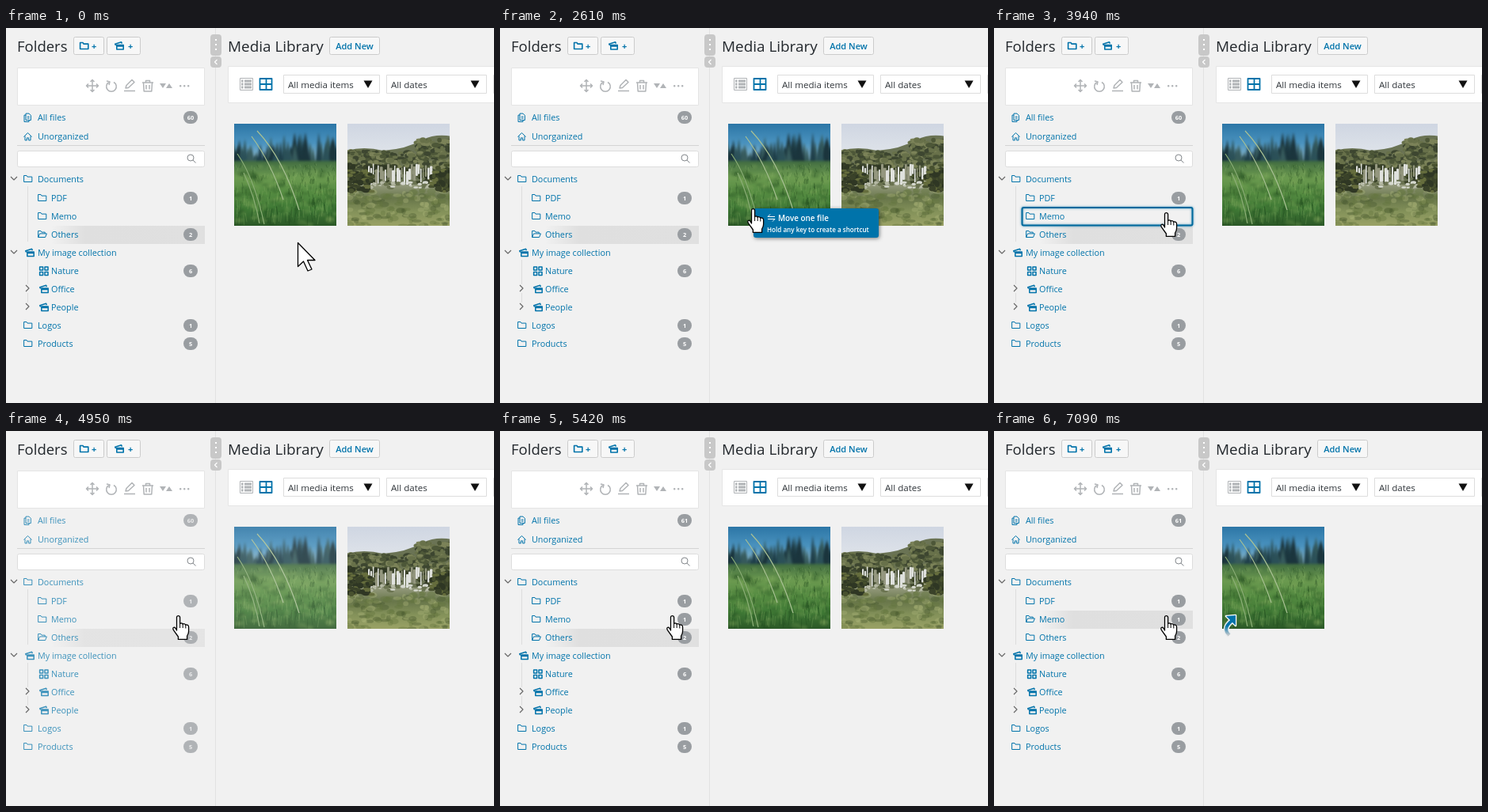
Animation, 616 px wide and 474 px high, one loop 8.67 s. Source, as an HTML page with a canvas:

```html
<!DOCTYPE html>
<html lang="en">
<head>
<meta charset="utf-8">
<title>Media folders</title>
<style>
html, body { margin: 0; width: 100%; height: 100%; overflow: hidden; background: #f1f1f1; }
canvas { display: block; }
</style>
</head>
<body>
<canvas id="stage" width="616" height="474"></canvas>
<script>
const LOOP = 8670;
const BLUE = '#0073aa', GREY = '#b1b4b7', BG = '#f1f1f1';
const FONT = '"Open Sans", "Noto Sans", sans-serif';
const ctx = document.getElementById('stage').getContext('2d');

// Pointer runs: start, end, number of steps
const RUNS = [[760, 1220, 7], [2080, 2920, 12], [3000, 3480, 7]];
// Pointer path: time, x, y
const PATH = [
  [690, 368, 271], [1220, 357, 225], [2000, 357, 225], [2400, 331, 232],
  [2537, 320, 228], [2614, 319, 228], [2920, 270, 221], [3240, 236, 232],
  [3320, 229, 232], [3400, 218, 233], [3480, 217, 233]
];
const FADE = [0.75, 0.6, 0.5, 0.5, 0.65, 0.85, 1];

const ICONS = {
  folder: 'M.6 1H4L5 2.6H10.8V9H.6Z',
  open: 'M.6 9V1H4L5 2.6H9.2V4.4M.6 9L2.6 4.4H11.4L9.6 9Z',
  stack: 'M1.6 5L.7 3.2L8.6 .8L9.4 2.6M2.8 4.6H11.2V10H2.8ZM2.8 6H11.2',
  grid: 'M.6 .6H4.6V4.6H.6ZM7 .6H11V4.6H7ZM.6 7H4.6V11H.6ZM7 7H11V11H7Z',
  files: 'M3 .6H7L9.4 3V9H3ZM3 2.6H1V11H7V9M4.8 4.6H7.6M4.8 6.6H7.6',
  home: 'M.4 6L5.5 1L10.6 6M2 5V10.4H4.4V7.4H6.6V10.4H9V5'
};

// label, y, icon, indent level, count
const ROWS = [
  ['All files', 113, 'files', 0, 60],
  ['Unorganized', 137, 'home', 0],
  ['Documents', 191, 'folder', 0],
  ['PDF', 215, 'folder', 1, 1],
  ['Memo', 238, 'folder', 1],
  ['Others', 261, 'folder', 1, 2],
  ['My image collection', 284, 'stack', 0],
  ['Nature', 307, 'grid', 1, 6],
  ['Office', 330, 'stack', 1],
  ['People', 353, 'stack', 1],
  ['Logos', 376, 'folder', 0, 1],
  ['Products', 399, 'folder', 0, 5]
];

function box(c, x, y, w, h, fill, line, r = 0) {
  c.beginPath();
  c.roundRect(x, y, w, h, r);
  if (fill) { c.fillStyle = fill; c.fill(); }
  if (line) { c.strokeStyle = line; c.lineWidth = 1; c.stroke(); }
}

function shape(d, x, y, { fill, line, width = 1.2, c = ctx } = {}) {
  const p = new Path2D(d);
  c.save();
  c.translate(x, y);
  c.lineJoin = 'round';
  if (fill) { c.fillStyle = fill; c.fill(p); }
  if (line) { c.strokeStyle = line; c.lineWidth = width; c.stroke(p); }
  c.restore();
}

function text(s, x, y, size, color, weight = 400, align = 'left') {
  ctx.font = `${weight} ${size}px ${FONT}`;
  ctx.fillStyle = color;
  ctx.textAlign = align;
  ctx.fillText(s, x, y);
}

function shade(c, x0, y0, x1, y1, ...colors) {
  const g = c.createLinearGradient(x0, y0, x1, y1);
  colors.forEach((k, i) => g.addColorStop(i / (colors.length - 1), k));
  return g;
}

function random(seed) {
  return () => (seed = (seed * 16807) % 2147483647) / 2147483647;
}

function picture(paint, seed) {
  const cv = document.createElement('canvas');
  cv.width = cv.height = 129;
  paint(cv.getContext('2d'), random(seed));
  return cv;
}

function blobs(c, rnd, n, [x, y, w, h], size, colors) {
  for (let i = 0; i < n; i++) {
    c.fillStyle = colors[Math.floor(rnd() * colors.length)];
    c.beginPath();
    c.ellipse(x + rnd() * w, y + rnd() * h, size * (0.6 + rnd()), size * (0.4 + rnd() * 0.6), 0, 0, 7);
    c.fill();
  }
}

const meadow = picture((c, rnd) => {
  box(c, 0, 0, 129, 129, shade(c, 0, 0, 0, 50, '#2c76a6', '#4b93bf', '#a4c8d6'));
  c.filter = 'blur(1.5px)';
  const pines = ['#1f3f4a', '#2b5058', '#1b353d', '#365a5c'];
  for (let i = 0; i < 60; i++) {
    const x = rnd() * 136 - 4;
    const top = 10 + rnd() * 24 + (x > 26 && x < 46 ? 12 : 0);
    const w = 4 + rnd() * 4;
    c.fillStyle = pines[i % 4];
    c.beginPath();
    c.moveTo(x, top); c.lineTo(x + w, 52); c.lineTo(x - w, 52);
    c.fill();
  }
  box(c, -4, 47, 137, 90, shade(c, 0, 47, 0, 129, '#406b40', '#6c9a50', '#548b41', '#3f7835', '#2b5827'));
  blobs(c, rnd, 120, [0, 54, 129, 75], 4, ['rgba(125,165,90,.3)', 'rgba(35,80,32,.3)']);
  c.filter = 'none';
  for (let i = 0; i < 260; i++) {
    const x = rnd() * 129, y = 54 + rnd() * 75, h = 3 + (y - 46) / 9;
    c.strokeStyle = rnd() < 0.5 ? 'rgba(140,180,105,.28)' : 'rgba(25,65,25,.3)';
    c.lineWidth = 1;
    c.beginPath();
    c.moveTo(x, y); c.lineTo(x + rnd() * 4 - 2, y - h);
    c.stroke();
  }
  const blade = { c, line: '#a8c093', width: 1.2 };
  shape('M29 9Q62 44 82 109M22 16Q46 48 62 96', 0, 0, blade);
  shape('M4 38Q25 68 38 127M12 62Q26 92 32 126', 0, 0, { ...blade, line: '#8bae76' });
}, 71);

const cascade = picture((c, rnd) => {
  const dark = ['#3a4229', '#48512f', '#2f3724'];
  const leafy = ['#4d5738', '#68714a', '#3d4630', '#7b8258'];
  box(c, 0, 0, 129, 129, shade(c, 0, 0, 0, 60, '#cfd6e2', '#e8ebee'));
  c.filter = 'blur(.7px)';
  shape('M0 34Q20 28 45 34Q75 32 95 20Q112 12 132 16V85H0Z', 0, 0, { c, fill: '#6a7354' });
  blobs(c, rnd, 130, [0, 34, 38, 30], 3.5, leafy);
  blobs(c, rnd, 170, [36, 36, 93, 22], 3.5, leafy);
  blobs(c, rnd, 90, [88, 20, 41, 22], 3.5, leafy);
  blobs(c, rnd, 90, [0, 52, 129, 24], 4, dark);
  for (let x = 26; x < 106; x += 3) {
    const top = 50 + rnd() * 10;
    box(c, x, top, 1 + rnd() * 3, 12 + rnd() * 14, rnd() < 0.6 ? '#dfe1dd' : '#94977f', null, 1);
  }
  box(c, -4, 77, 137, 56, shade(c, 0, 77, 0, 129, '#949a7d', '#68764a', '#84925a', '#9aa266'));
  blobs(c, rnd, 140, [0, 84, 129, 45], 4, ['rgba(66,82,42,.35)', 'rgba(176,184,124,.35)', 'rgba(100,118,62,.4)']);
  blobs(c, rnd, 40, [28, 74, 80, 7], 2.5, ['#d6d9cf', '#b5b9a4', '#6a7350']);
  blobs(c, rnd, 70, [0, 60, 30, 26], 3.5, [...dark, '#656d3d']);
  blobs(c, rnd, 60, [104, 58, 25, 28], 3.5, [...dark, '#656d3d']);
}, 29);

function stepsAt(t) {
  let now = 0, last = 0;
  for (const [a, b, n] of RUNS) {
    if (t < a) break;
    const gap = (b - a) / (n - 1);
    const k = Math.min(n - 1, Math.floor((t - a + 12) / gap));
    now = a + k * gap;
    last = now - gap;
  }
  return [now, last];
}

function pointAt(t) {
  let i = PATH.findIndex(p => p[0] > t);
  if (i < 0) i = PATH.length;
  const a = PATH[Math.max(0, i - 1)], b = PATH[Math.min(i, PATH.length - 1)];
  const u = a === b ? 0 : (t - a[0]) / (b[0] - a[0]);
  return [1, 2].map(k => Math.round(a[k] + (b[k] - a[k]) * u));
}

function header() {
  text('Folders', 14, 30, 18.5, '#23282d');
  text('Media Library', 280, 30, 18.9, '#23282d');
  [[85, 39], [127, 43], [408, 64]].forEach(([x, w]) => box(ctx, x + .5, 11.5, w - 1, 22, '#f7f7f7', '#ccc', 2));
  shape(ICONS.folder, 93, 17.5, { line: BLUE, width: 1.6 });
  shape(ICONS.stack, 137, 17, { line: BLUE, width: 1.6 });
  text('+', 108, 27, 11, BLUE, 700);
  text('+', 154, 27, 11, BLUE, 700);
  text('Add New', 440, 27, 11, BLUE, 600, 'center');
}

function splitter() {
  box(ctx, 264, 0, 1, 474, '#e2e2e2');
  box(ctx, 258, 8, 14, 27, '#c8c8c8', null, 4);
  box(ctx, 258, 36, 14, 14, '#c8c8c8', null, 4);
  [14, 20, 26].forEach(y => box(ctx, 264, y, 2, 2, '#fff'));
  shape('M3 0L0 3L3 6', 263.5, 40, { line: '#fff' });
}

function toolbar() {
  box(ctx, 14.5, 50.5, 236, 47, '#fff', '#e5e5e5');
  const pen = { line: GREY, width: 1.5 };
  shape('M0-7V7M-7 0H7M-2.5-5L0-7.5L2.5-5M-2.5 5L0 7.5L2.5 5M-5-2.5L-7.5 0L-5 2.5M5-2.5L7.5 0L5 2.5', 109, 73, pen);
  shape('M3-5A6.3 6.3 0 1 1-3-5M-6-6.5L-2-5.5L-3-1.5', 133, 73.5, pen);
  shape('M-7 7.5H7M-5 4L-4 .5L3-6.5L6-3.5L-1.5 3.5Z', 156, 72, pen);
  shape('M-7-4H7M-2.5-4V-6.5H2.5V-4M-5.5-4L-4.8 7H4.8L5.5-4M-2-1V4.5M2-1V4.5', 179, 73, pen);
  shape('M-8-2.5H0L-4 3.5ZM0 3.5H8L4-2.5Z', 202, 72.5, { fill: GREY });
  [219, 224, 229].forEach(x => box(ctx, x, 72, 2.4, 2.4, GREY, null, 1));
}

function filters() {
  box(ctx, 280.5, 48.5, 350, 46, '#fff', '#e5e5e5');
  box(ctx, 295.5, 63.5, 16, 15, null, GREY);
  [65.5, 69.5, 73.5].forEach(y => {
    box(ctx, 297, y, 2.5, 3, GREY);
    box(ctx, 301, y, 9, 3, GREY);
  });
  shape('M0 0H15V14H0ZM8 0V14M0 7H15', 320.5, 64, { line: BLUE, width: 1.8 });
  [[350, 122, 'All media items'], [480, 127, 'All dates'], [615, 120, '']].forEach(([x, w, s]) => {
    box(ctx, x + .5, 59.5, w - 1, 23, '#fff', '#ddd');
    text(s, x + 6, 76, 11.6, '#32373c');
    shape('M-5.5-4.5H5.5L0 5Z', x + w - 15, 71, { fill: '#111' });
  });
}

function row([label, y, icon, level, count], selected) {
  const shift = icon === 'stack' || icon === 'grid' ? 2 : 0;
  const x = (level ? 40 : 22) + shift;
  if (selected) {
    const g = ctx.createLinearGradient(57, 0, 251, 0);
    g.addColorStop(0, BG);
    g.addColorStop(.22, '#dfdfdf');
    g.addColorStop(1, '#e0e0e0');
    box(ctx, 57, y - 11, 194, 23, g);
  }
  shape(ICONS[selected ? 'open' : icon], x, y - 5.5, { line: BLUE, width: shift ? 1.5 : 1 });
  text(label, level ? 57 : 40, y + 4, 10.8, BLUE);
  if (count) {
    box(ctx, 224, y - 8, 18, 16, '#999da1', null, 8);
    text(count, 233, y + 2.6, 7.4, '#fff', 700, 'center');
  }
}

function tree(t, alpha, drop) {
  box(ctx, 14, 148, 237, 1, '#d4d4d4');
  box(ctx, 14.5, 155.5, 236, 20, '#fff', '#ddd', 2);
  shape('M4 0A4 4 0 1 1-4 0A4 4 0 1 1 4 0M3 3L6.5 6.5', 233, 164, { line: '#84888c', width: 1 });
  [[200, 70], [293, 60]].forEach(([y, h]) => box(ctx, 27, y, 1, h, '#dcdcdc'));
  const pen = { line: '#666', width: 1.1 };
  [191, 284].forEach(y => shape('M-4-2L0 2L4-2', 10, y - 1, pen));
  [330, 353].forEach(y => {
    box(ctx, 23, y - 6, 8, 11, BG);
    shape('M-2-4L2 0L-2 4', 27, y - 1, pen);
  });

  const added = t >= 5180;
  const current = t >= 6890 ? 'Memo' : 'Others';
  ctx.globalAlpha = alpha;
  for (const [label, y, icon, level, count] of ROWS) {
    const more = added && (label === 'All files' || label === 'Memo') ? 1 : 0;
    row([label, y, icon, level, (count || 0) + more], label === current);
  }
  ctx.globalAlpha = 1;
  if (drop) {
    ctx.save();
    ctx.shadowColor = 'rgba(0,115,170,.7)';
    ctx.shadowBlur = 3;
    ctx.strokeStyle = '#00699c';
    ctx.lineWidth = 2;
    ctx.beginPath();
    ctx.roundRect(35.5, 227, 215, 22.5, 2);
    ctx.stroke();
    ctx.restore();
  }
}

function thumbs(t, alpha) {
  if (t < 6890) {
    ctx.globalAlpha = (1 + alpha) / 2;
    ctx.drawImage(meadow, 288, 121);
    ctx.globalAlpha = 1;
    ctx.drawImage(cascade, 431, 121);
  } else if (t >= 7090) {
    ctx.drawImage(meadow, 288, 121);
    const tail = 'M297 258Q288 250 300 240';
    const head = 'M293 234L305 233L305 246Z';
    shape(tail, 0, 0, { line: '#e8ecee', width: 7 });
    shape(head, 0, 0, { line: '#fff', width: 2.5 });
    shape(tail, 0, 0, { line: shade(ctx, 0, 246, 0, 258, BLUE, '#c3c9cd'), width: 4 });
    shape(head, 0, 0, { fill: BLUE });
  }
}

function tip(x, y) {
  ctx.save();
  ctx.shadowColor = 'rgba(0,0,0,.5)';
  ctx.shadowBlur = 5;
  ctx.shadowOffsetX = ctx.shadowOffsetY = 1;
  box(ctx, x, y, 158, 37, BLUE, null, 3);
  ctx.restore();
  shape('M0 3H9M0 3L3 0M9 6H0M9 6L6 9', x + 18, y + 7.5, { line: '#fff', width: 1 });
  text('Move one file', x + 31, y + 16, 9.9, '#fff', 600);
  text('Hold any key to create a shortcut', x + 17, y + 29.5, 8.1, '#fff', 600);
}

function pointer(x, y) {
  const ink = { fill: '#fff', line: '#000', width: 1.3 };
  if (y > 250) {
    shape('M.5 .5V30.5L7.5 24L13 36L18 34L12.5 22.5H22Z', x, y, ink);
    return;
  }
  shape('M5.5 19V2.6Q5.5 .6 7.5 .6T9.6 2.6V10.4Q11.4 9 13.2 11Q15 9.8 16.8 12Q20.6 11.4 20.6 15V20' +
    'Q20.6 23 18.6 26V30.4H7.4V27L1.4 18.6Q-.2 15.4 2.4 15.2Q4 15.4 5.5 19Z', x - 7, y, ink);
  shape('M9.6 10V16M13.2 11V16M16.8 12V16.5', x - 7, y, { line: '#000', width: 1 });
}

function draw(t) {
  const [now, last] = stepsAt(t);
  const [x, y] = pointAt(now);
  const fadeStep = Math.floor((t - 4950) / 78);
  const alpha = t < 4950 ? 1 : FADE[Math.min(fadeStep, FADE.length - 1)];
  box(ctx, 0, 0, 616, 474, BG);
  header();
  toolbar();
  filters();
  splitter();
  tree(t, alpha, x < 251 && t < 4950);
  thumbs(t, alpha);
  if (t >= 2305 && t < 3940) tip(...pointAt(t >= 3480 ? now : last));
  pointer(x, y);
}

const start = performance.now();
function frame() {
  draw((performance.now() - start) % LOOP);
  requestAnimationFrame(frame);
}
frame();
</script>
</body>
</html>
```
